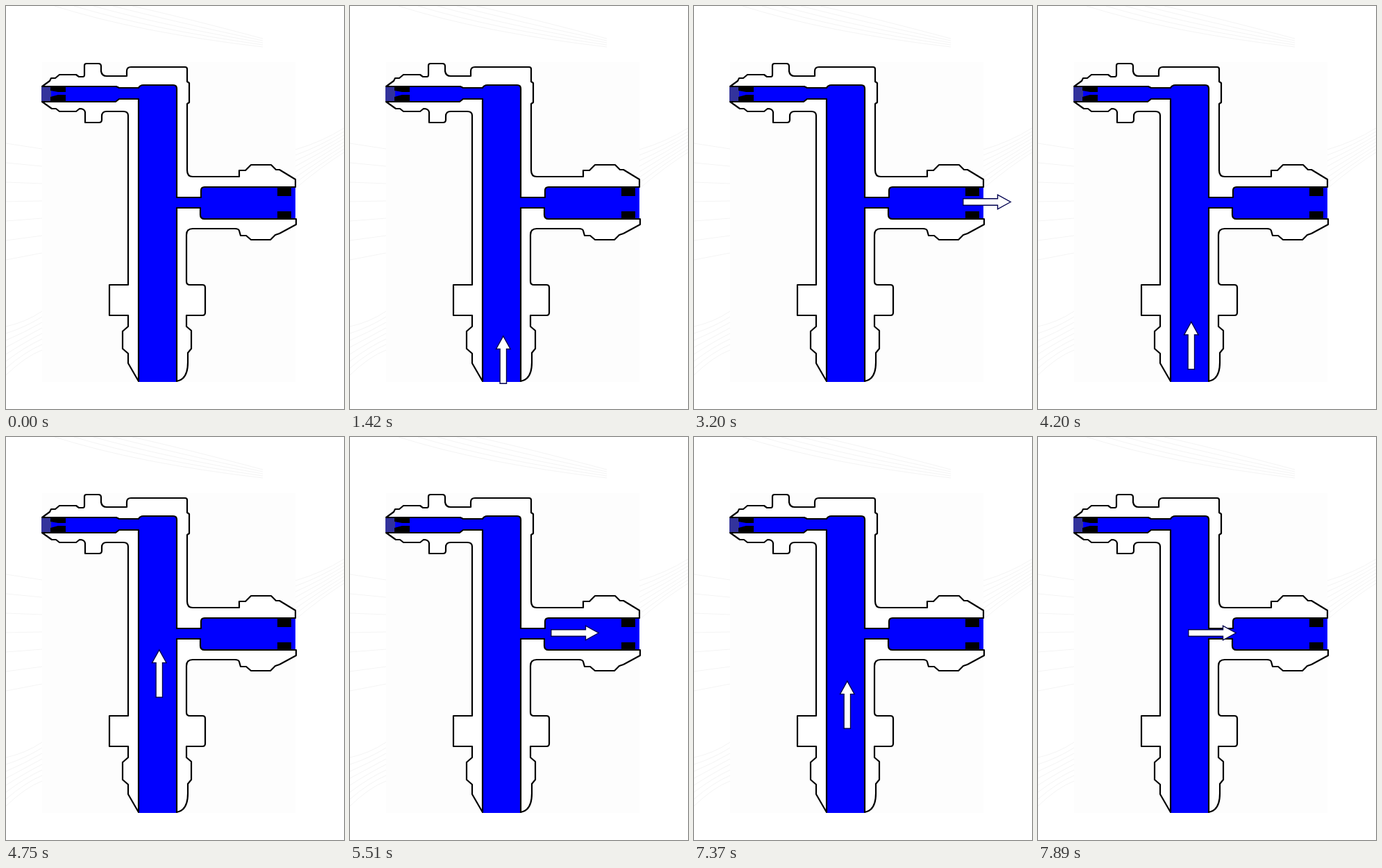
These frames come from a looping animation (487x581 px, 8 s). An HTML page:

```html
<!DOCTYPE html>
<html lang="en">
<head>
<meta charset="utf-8">
<title>Flow through a tee fitting</title>
<style>
  html, body { margin: 0; width: 100%; height: 100%; overflow: hidden; background: #fff; }
  svg { display: block; width: 487px; height: 581px; }
  .faint { fill: none; stroke: #f4f4f4; stroke-width: 1; }
  .hatch { fill: none; stroke: #000; stroke-width: 2.1; }
  .edge { fill: none; stroke: #000; stroke-width: 2.2; stroke-linejoin: round; }
  .arrow { fill: #fff; stroke: #000050; stroke-width: 1.4; }
</style>
</head>
<body>
<svg viewBox="0 0 487 581">
  <defs>
    <g id="walls">
      <path d="M52 116L63 108L65 104H71L77 99H101L105 102H111Q113 102 113 99V86Q113 83 116 83H133Q137 83 137 87V94Q138 101 145 101H174V94Q174 88 180 88H258Q261 88 261 91V109L264 111V139L261 141V237Q261 246 269 246H336V237H345L353 229H382L389 236H394L417 250V261H286Q281 261 281 266V276H246V119Q246 114 241 114H198Q193 114 191 118H163L159 116Z"/>
      <path d="M246 291H280V301Q280 307 286 307H418V315L394 328L388 330L381 337H353L346 331H338L336 324Q335 321 330 321H269Q260 321 260 330V397Q260 402 265 402H283Q287 402 287 406V442Q287 446 283 446H260V462L267 468V494L262 500V514Q262 538 246 541Z"/>
      <path d="M191 541L176 515V501L168 494V469L176 462V446H149V402H176V158Q176 152 169 152H145Q138 152 138 159V164Q138 168 134 168H114V153Q113 148 106 148L101 152H77L72 148H66L52 138H158L163 134H191Z"/>
    </g>
    <clipPath id="inside">
      <use href="#walls"/>
    </clipPath>
  </defs>
  <path id="waves" class="faint"/>
  <rect x="52" y="81" width="365" height="461" fill="#fdfdfd"/>
  <path fill="#00f" d="M52 116H159L163 118H191Q193 114 198 114H241Q246 114 246 119V276H281V266Q281 261 286 261H417V307H286Q280 307 280 301V291H246V542H191V134H163L158 138H52Z"/>
  <rect x="51" y="117" width="14" height="20" fill="#33339c"/>
  <use href="#walls" fill="#fff"/>
  <g clip-path="url(#inside)"><path id="hatch" class="hatch"/></g>
  <use href="#walls" class="edge"/>
  <path d="M64 115H86V124H75L64 122ZM64 131L75 128H86V139H64ZM391 261H411V274H391ZM391 296H411V308H391Z"/>
  <!-- Tip at the local origin, pointing up -->
  <path id="arrow" class="arrow" d="M0 .8L10.3 19.5H4.7V69.2H-4.7V19.5H-10.3Z"/>
</svg>
<script>
const LOOP = 8000, LENGTH = 70, PIPE_X = 220.8, BRANCH_Y = 282.5;
const byId = id => document.getElementById(id);
const repeat = (count, draw) => Array.from({ length: count }, (_, i) => draw(i)).join('');

byId('hatch').setAttribute('d', repeat(56, i => `M${7.7 + 18.3 * i} 0l-600 600`));
byId('waves').setAttribute('d',
  repeat(5, i => `M${70 + i * 28} 0Q${190 + i * 18} ${38 - i * 5} 370 ${59 - i * 3}`) +
  repeat(8, i => `M417 ${207 + i * 8}Q455 ${196 + i * 5} 487 ${176 + i * 5}`) +
  repeat(7, i => `M0 ${198 + i * 28}L52 ${206 + i * 25}`) +
  repeat(8, i => `M0 ${462 + i * 10}Q28 ${456 + i * 7} 52 ${440 + i * 8}`));

// direction, start ms, end ms, steps, first and last position
// (tip y when going up, tail x when going right)
const moves = [
  ['up', 1360, 2060, 9, 475, 285],
  ['up', 2150, 2220, 1, 262, 254],
  ['right', 2300, 2960, 8, 203, 338],
  ['right', 3030, 3200, 2, 354, 387],
  ['up', 4010, 4750, 9, 497, 306],
  ['up', 4850, 4930, 1, 283, 261],
  ['right', 5010, 5510, 6, 184, 289],
  ['right', 5580, 5640, 1, 310, 331],
  ['right', 5740, 5980, 3, 345, 387],
  ['up', 6820, 7600, 10, 489, 292],
  ['up', 7670, 7740, 1, 270, 247],
  ['right', 7820, 7890, 1, 190, 216]
];

const arrow = byId('arrow');

function render(time) {
  const move = moves.findLast(m => time >= m[1]);
  arrow.style.display = move ? '' : 'none';
  if (!move) return;
  const [direction, start, end, steps, from, to] = move;
  const step = Math.min(steps, Math.floor((time - start + 1) / (end - start) * steps));
  const place = from + (to - from) * step / steps;
  arrow.setAttribute('transform', direction === 'up'
    ? `translate(${PIPE_X} ${place})`
    : `translate(${place + LENGTH} ${BRANCH_Y}) rotate(90)`);
}

const origin = performance.now();
function tick() {
  render((performance.now() - origin) % LOOP);
  requestAnimationFrame(tick);
}
tick();
</script>
</body>
</html>
```
